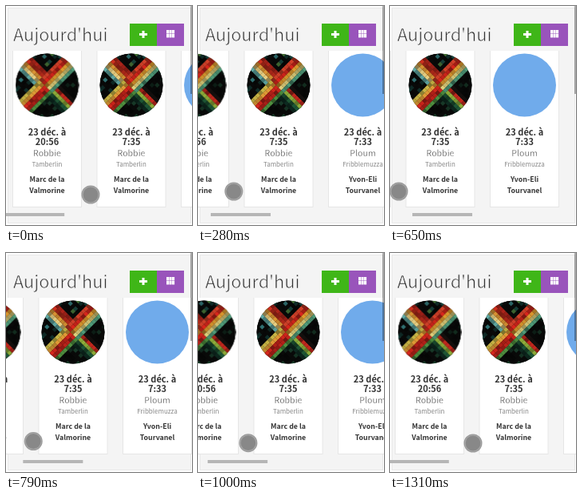
Write an HTML page with a canvas that moves like this. It is 233 px wide and 274 px high and loops after 1380 ms.

```html
<!DOCTYPE html>
<html lang="fr">
<head>
<meta charset="utf-8">
<title>Aujourd'hui</title>
<style>
  html, body { margin: 0; width: 100%; height: 100%; overflow: hidden; background: #fff; }
  canvas { display: block; }
</style>
</head>
<body>
<canvas id="stage" width="233" height="274"></canvas>
<script>
const ctx = document.getElementById('stage').getContext('2d');
const FONT = '"Noto Sans CJK JP", "Noto Sans CJK SC", "Noto Sans CJK", "Open Sans", sans-serif';
const PANEL = '#f4f4f4';
const LOOP = 1380, STEPS = 19;
const PITCH = 105.5, CARD_W = 86;

const cards = [
  { time: '20:56', name: 'Robbie', title: 'Tamberlin', author: ['Marc de la', 'Valmorine'], mosaic: true },
  { time: '7:35', name: 'Robbie', title: 'Tamberlin', author: ['Marc de la', 'Valmorine'], mosaic: true },
  { time: '7:33', name: 'Ploum', title: 'Fribblemuzza', author: ['Yvon-Eli', 'Tourvanel'] }
];

// step, left edge of the second card, pointer x, pointer y
const keys = [
  [0, 114, 106, 236], [2, 86, 69, 232], [6, 36, 27, 232], [9, 20, 11, 232],
  [12, 54, 48, 237], [16, 86, 78, 238], [18, 112, 104, 238], [STEPS, 114, 106, 236]
];

function stepAt(t) {
  if (t < 580) return Math.min(Math.floor(t / 70), 7);
  if (t < 1240) return Math.min(8 + Math.floor((t - 580) / 70), 16);
  return 17 + Math.floor((t - 1240) / 70);
}

// Monotone tangent: flat wherever the drag turns round
function tangent(i, c) {
  if (i === 0 || i === keys.length - 1) return 0;
  const [p, k, n] = [keys[i - 1], keys[i], keys[i + 1]];
  const before = (k[c] - p[c]) / (k[0] - p[0]);
  const after = (n[c] - k[c]) / (n[0] - k[0]);
  return before * after <= 0 ? 0 : 2 * before * after / (before + after);
}

function valueAt(step, c) {
  let i = 0;
  while (step >= keys[i + 1][0]) i++;
  const a = keys[i], b = keys[i + 1], d = b[0] - a[0], u = (step - a[0]) / d;
  const u2 = u * u, u3 = u2 * u;
  return a[c] * (2 * u3 - 3 * u2 + 1) + b[c] * (3 * u2 - 2 * u3)
    + d * (tangent(i, c) * (u3 - 2 * u2 + u) + tangent(i + 1, c) * (u3 - u2));
}

function rect(x, y, w, h, color) {
  ctx.fillStyle = color;
  ctx.fillRect(x, y, w, h);
}

function disc(x, y, r, color) {
  ctx.fillStyle = color;
  ctx.beginPath();
  ctx.arc(x, y, r, 0, 2 * Math.PI);
  ctx.fill();
}

function label(str, x, y, size, weight, color, align = 'center') {
  ctx.font = `${weight} ${size}px ${FONT}`;
  ctx.fillStyle = color;
  ctx.textAlign = align;
  ctx.fillText(str, x, y);
}

// Light-weight lettering: the ground colour trims the stems
function thinLabel(str, x, y, size, color, ground, trim, align) {
  label(str, x, y, size, 400, color, align);
  ctx.strokeStyle = ground;
  ctx.lineWidth = trim;
  ctx.lineJoin = 'round';
  ctx.strokeText(str, x, y);
}

// Diagonal tiles: a cross of four striped arms on a dark ground
function makeMosaic() {
  const art = document.createElement('canvas');
  art.width = art.height = 80;
  const g = art.getContext('2d');
  let seed = 11;
  const random = () => (seed = seed * 16807 % 2147483647) / 2147483647;
  const pick = list => list[Math.floor(random() * list.length)];
  const arms = {
    upRight: ['#d9432a', '#d8261c', '#e8a030', '#e0cf7a', '#4f9a78'],
    downLeft: ['#c9b545', '#e09a35', '#d8261c', '#c4241b', '#4f8f3f'],
    upLeft: ['#5fa9a4', '#e8cf80', '#e59a35', '#d8321f', '#c0281d'],
    downRight: ['#0d2a20', '#1f5a38', '#8fae3a', '#c0281d', '#14100e']
  };
  const tileColor = (a, b) => {
    if (Math.abs(a) <= 2) return arms[b >= 0 ? 'upRight' : 'downLeft'][a + 2];
    if (Math.abs(b) <= 2) return arms[a > 0 ? 'downRight' : 'upLeft'][b + 2];
    if (random() < 0.25) return pick(a < 0 ? ['#2f6f70', '#16403a', '#4a7a3a'] : ['#10261c', '#183a28']);
    return '#090a09';
  };
  g.arc(40, 40, 39.5, 0, 2 * Math.PI);
  g.clip();
  g.fillStyle = '#090a09';
  g.fillRect(0, 0, 80, 80);
  g.translate(40, 40);
  g.rotate(Math.PI / 4);
  const size = 4.6;
  for (let a = -9; a <= 9; a++) {
    for (let b = -9; b <= 9; b++) {
      const tile = [(a - 0.5) * size, (-b - 0.5) * size, size, size];
      g.fillStyle = tileColor(a, b);
      g.fillRect(...tile);
      g.fillStyle = `rgba(0, 0, 0, ${0.45 * random() ** 2})`;
      g.fillRect(...tile);
    }
  }
  return art;
}
const mosaic = makeMosaic();

function drawCard(card, x) {
  const mid = x + CARD_W / 2;
  rect(x - 0.5, 56, CARD_W + 1, 196, '#e6e6e6');
  rect(x + 0.5, 56, CARD_W - 1, 195, '#fff');
  if (card.mosaic) ctx.drawImage(mosaic, mid - 40, 59);
  else disc(mid, 99, 39.5, '#70abeb');
  label('23 déc. à', mid, 162, 11, 700, '#333');
  label(card.time, mid, 174, 11, 700, '#333');
  thinLabel(card.name, mid, 187.5, 10.6, '#444', '#fff', 0.3);
  label(card.title, mid, 200.5, 8, 400, '#888');
  card.author.forEach((line, i) => label(line, mid, 219.5 + 14 * i, 8.8, 700, '#333'));
}

function drawHeader() {
  thinLabel("Aujourd'hui", 9, 44, 21.7, '#333', PANEL, 0.7, 'left');
  rect(155, 22, 34, 28, '#3fb618');
  rect(189, 22, 34, 28, '#9954bb');
  rect(167, 34, 10, 3, '#fff');
  rect(170.5, 31, 3, 9, '#fff');
  for (let i = 0; i < 6; i++) rect(201 + 3.5 * (i % 3), 30 + 5 * Math.floor(i / 3), 3.1, 4.5, '#fff');
}

function draw(now) {
  const step = stepAt(now % LOOP);
  const left = Math.round(valueAt(step, 1)), px = valueAt(step, 2), py = valueAt(step, 3);
  rect(0, 0, 233, 274, '#fff');
  rect(2, 2, 230, 270, '#e8e8e8');
  rect(3, 3, 228, 268, PANEL);
  drawHeader();
  cards.forEach((card, i) => drawCard(card, left + (i - 1) * PITCH));
  rect(34.4 - 0.318 * left, 259, 75, 4, '#b6b6b6');
  rect(231, 0, 2, 110, 'rgba(0, 0, 0, 0.33)');
  disc(px, py, 11.5, '#9a9a9a');
  disc(px, py, 10.3, '#aaa');
  disc(px, py, 9.4, '#888');
}

const start = performance.now();
function tick() {
  draw(performance.now() - start);
  requestAnimationFrame(tick);
}
tick();
</script>
</body>
</html>
```
